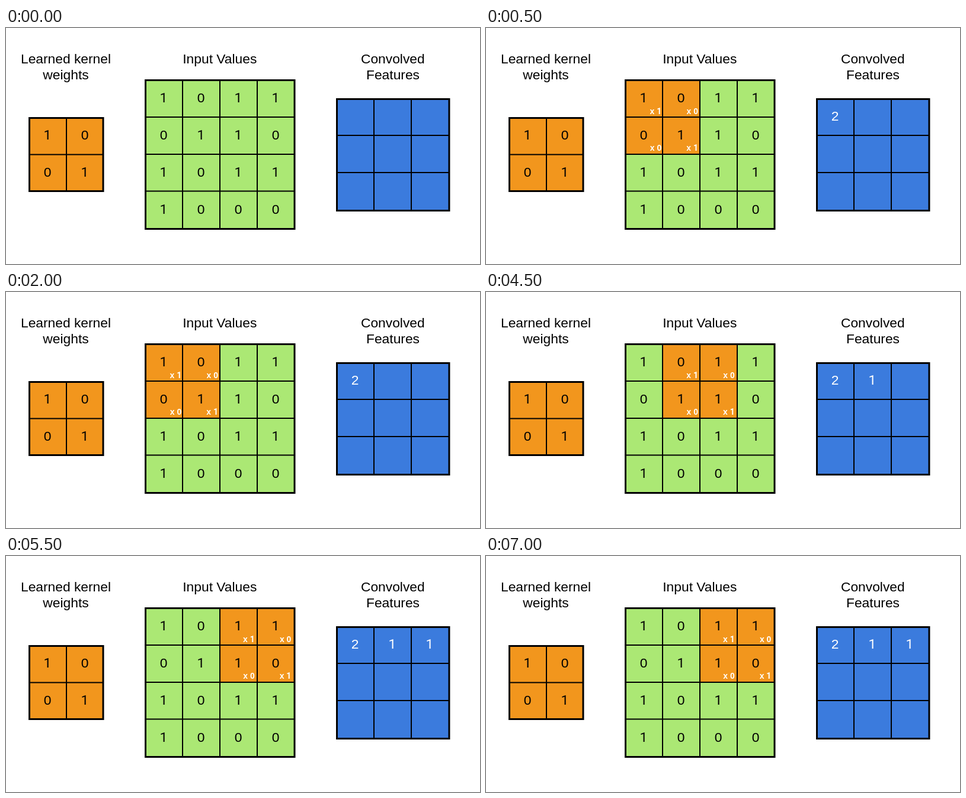
An HTML page for the animation above (8 s loop, 800 px wide and 400 px high).

```html
<!DOCTYPE html>
<html lang="en">
<head>
<meta charset="utf-8">
<title>Convolution</title>
<style>
html, body { margin: 0; width: 100%; height: 100%; overflow: hidden; background: #fff; }
svg { display: block; width: 100%; height: 100%; }
text { font: 22.8px "Liberation Sans", Arial, sans-serif; text-anchor: middle; }
.one { font-family: Roboto, sans-serif; }
.weight { font-size: 14px; font-weight: 700; fill: #fff; text-anchor: end; }
</style>
</head>
<body>
<svg id="stage" viewBox="0 0 800 400"></svg>
<script>
const ORANGE = '#f2961d', GREEN = '#abe874', BLUE = '#3b7bdd';
const CELL = 63, LOOP = 8000;
const KERNEL = [[1, 0], [0, 1]];
const INPUT = [[1, 0, 1, 1], [0, 1, 1, 0], [1, 0, 1, 1], [1, 0, 0, 0]];
const RESULTS = [2, 1, 1];
// start time in ms, column of the sliding window (-1: none yet)
const STEPS = [[0, -1], [500, 0], [3000, 1], [5500, 2]];

const stage = document.getElementById('stage');

function add(parent, tag, attrs, content) {
  const el = document.createElementNS('http://www.w3.org/2000/svg', tag);
  for (const key in attrs) el.setAttribute(key, attrs[key]);
  if (content !== undefined) el.textContent = content;
  parent.append(el);
  return el;
}

function digit(parent, value, x, y, fill = '#000') {
  return add(parent, 'text', { x, y, fill, class: value === 1 ? 'one' : '' }, value);
}

function lines(x, y, size, xs, ys, right, bottom) {
  const inner = xs.map(v => `M${v} ${y}V${bottom}`).join('') +
                ys.map(v => `M${x} ${v}H${right}`).join('');
  add(stage, 'path', { d: inner, stroke: '#000', 'stroke-width': 2 });
  add(stage, 'rect', {
    x, y, width: right - x, height: bottom - y,
    fill: 'none', stroke: '#000', 'stroke-width': 3
  });
}

function fillBox(x, y, right, bottom, fill) {
  return add(stage, 'rect', { x, y, width: right - x, height: bottom - y, fill });
}

function digits(rows, x, y) {
  rows.forEach((row, r) => row.forEach((v, c) => digit(stage, v, x + c * CELL, y + r * CELL)));
}

[['Learned kernel', 101, 60], ['weights', 101, 87], ['Input Values', 360.8, 59.5],
 ['Convolved', 652.8, 59.5], ['Features', 653, 86.5]]
  .forEach(([label, x, y]) => add(stage, 'text', { x, y }, label));

fillBox(39.5, 152.5, 164, 276.5, ORANGE);
lines(39.5, 152.5, 2, [102], [214.5], 164, 276.5);
digits(KERNEL, 70, 189);

fillBox(235.5, 88.5, 487, 340.5, GREEN);
const windowBox = fillBox(235, 88.5, 361, 214, ORANGE);
lines(235.5, 88.5, 4, [298, 361, 424], [151, 214, 276.5], 487, 340.5);
digits(INPUT, 266, 125.5);

const weights = add(stage, 'g', {});
KERNEL.forEach((row, r) => row.forEach((v, c) => {
  const el = add(weights, 'text', { x: 296.3 + c * 61.7, y: 146 + r * 62, class: 'weight' }, 'x ');
  add(el, 'tspan', { class: v === 1 ? 'one' : '' }, v);
}));

fillBox(558.5, 120.5, 748, 309.5, BLUE);
lines(558.5, 120.5, 3, [621, 684], [182, 245], 748, 309.5);
const results = RESULTS.map((v, i) => digit(stage, v, 589 + i * CELL, 157, '#fff'));

const show = (el, on) => el.setAttribute('visibility', on ? 'visible' : 'hidden');

function frame() {
  const t = performance.now() % LOOP;
  const col = STEPS.filter(step => step[0] <= t).pop()[1];
  show(windowBox, col >= 0);
  show(weights, col >= 0);
  windowBox.setAttribute('x', 235 + Math.max(col, 0) * CELL);
  weights.setAttribute('transform', `translate(${Math.max(col, 0) * 61.7} 0)`);
  results.forEach((el, i) => show(el, i <= col));
  requestAnimationFrame(frame);
}
frame();
</script>
</body>
</html>
```
